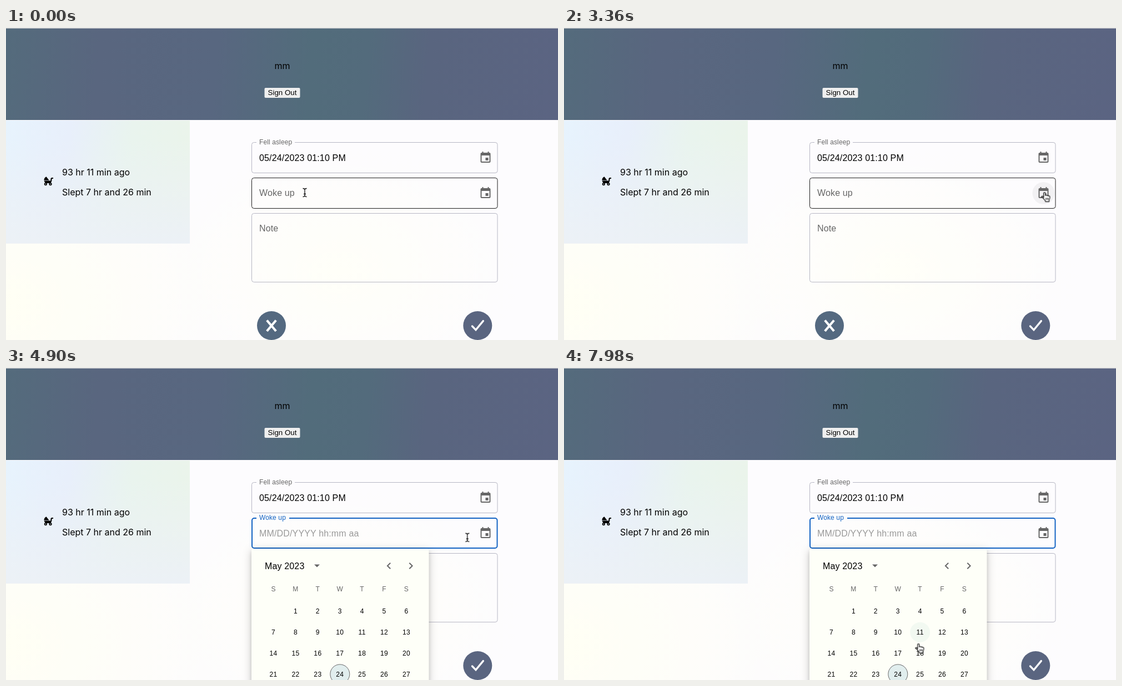
Write an HTML page that moves like this. It is 994 px wide and 563 px high and loops after 8000 ms.

```html
<!DOCTYPE html>
<html lang="en">
<head>
<meta charset="utf-8">
<title>Sleep log</title>
<style>
html, body { margin: 0; width: 100%; height: 100%; overflow: hidden; }
#stage {
  position: relative; width: 994px; height: 563px; overflow: hidden;
  background:
    radial-gradient(ellipse 420px 330px at 0 500px, #fffff4, #fffff400),
    radial-gradient(ellipse 330px 230px at 600px 440px, #fffff8, #fffff800),
    #fdfcfe;
}
#stage > * { position: absolute; left: 0; }
header {
  top: 0; width: 994px; height: 165px; border-top: 1px solid #c4c6cb;
  background: linear-gradient(95deg, #546b7c 0, #59667f 17%, #586780 38%, #526c7b 55%, #536b7c 65%, #59657f 76%, #5b6482);
}
aside {
  top: 167px; width: 331px; height: 222px;
  background:
    linear-gradient(0deg, #ecf1f6, #ecf1f600 85%),
    linear-gradient(100deg, #e7f3fd, #e8effb 32%, #e9f4ee 62%, #ebf4ea);
}
svg { top: 0; }
text { font: 16px "Liberation Sans", Arial, sans-serif; letter-spacing: .15px; }
.inter { font-family: Inter, sans-serif; letter-spacing: 0; }
.mid { text-anchor: middle; }
.small { font-size: 12px; letter-spacing: .11px; }
.days { font-size: 12px; letter-spacing: .4px; }
.grey { fill: #666; }
.line { fill: none; stroke: #b7b7c4; }
.dark { stroke: #1f1f1f; }
.blue { stroke: #1363c3; stroke-width: 2; }

.anim { animation: 8s linear infinite; }
.step { animation: 8s step-end infinite; }

.label { animation-name: label; }
@keyframes label {
  0%, 56% { transform: translate(456px, 303px); fill: #666; animation-timing-function: cubic-bezier(0, 0, .2, 1); }
  57.75%, 58.99% { transform: translate(456px, 275px) scale(.76); fill: #5a5a5a; }
  59.2%, 100% { transform: translate(456px, 274px) scale(.75); fill: #1363c3; }
}
.hint { animation-name: hint; }
@keyframes hint { 0%, 56% { opacity: 0 } 57.75%, 100% { opacity: 1 } }

.popup { animation-name: popup; transform-origin: 601.5px 326px; }
@keyframes popup {
  0%, 56% { opacity: 0; transform: scale(.75, .5625); }
  57.75%, 59% { opacity: .66; transform: scale(.973, .955); animation-timing-function: ease-out; }
  61%, 100% { opacity: 1; transform: none; }
}
.paper { fill: #fefff8; filter: drop-shadow(0 4px 3px #0002) drop-shadow(0 3px 8px #0003); }

.idle { animation-name: idle; }
@keyframes idle { 0% { opacity: 1 } 56%, 100% { opacity: 0 } }
.focus { animation-name: focus; }
@keyframes focus { 0% { opacity: 0 } 56% { opacity: 1 } 59%, 100% { opacity: 0 } }
.notched { animation-name: notched; }
@keyframes notched { 0% { opacity: 0 } 59%, 100% { opacity: 1 } }

.halo { animation-name: halo; }
@keyframes halo {
  0%, 9.2% { opacity: 0 } 11%, 56% { opacity: .045 }
  57.75%, 59% { opacity: .06 } 61%, 100% { opacity: 0 }
}
.dayhover { animation-name: dayhover; }
@keyframes dayhover { 0%, 97.7% { opacity: 0 } 98.8%, 100% { opacity: 1 } }

.cursor { animation-name: cursor; }
@keyframes cursor {
  0%, .5% { transform: translate(538px, 297px); animation-timing-function: ease-in-out; }
  10% { transform: translate(858px, 299px); animation-timing-function: ease-out; }
  16%, 56% { transform: translate(865px, 297px); }
  57.75%, 59% { transform: translate(838px, 303px); animation-timing-function: ease-out; }
  62%, 72% { transform: translate(830px, 306px); }
  78%, 91.5% { transform: translate(830px, 311px); animation-timing-function: ease-in-out; }
  99.75%, 100% { transform: translate(638px, 498px); }
}
.beam { animation-name: beam; }
@keyframes beam { 0% { opacity: 1 } 9.2% { opacity: 0 } 59.2% { opacity: 1 } 95%, 100% { opacity: 0 } }
.hand { animation-name: hand; }
@keyframes hand { 0% { opacity: 0 } 9.2% { opacity: 1 } 59.2% { opacity: 0 } 95%, 100% { opacity: 1 } }
</style>
</head>
<body>
<div id="stage">
  <header></header>
  <aside></aside>
  <svg id="art" width="994" height="563" viewBox="0 0 994 563"></svg>
</div>
<script>
const icons = {
  event: "M17 12h-5v5h5v-5zM16 1v2H8V1H6v2H5c-1.1 0-2 .9-2 2v14c0 1.1.9 2 2 2h14c1.1 0 2-.9 2-2V5c0-1.1-.9-2-2-2h-1V1h-2zm3 18H5V8h14v11z",
  left: "M15.4 7.4 14 6l-6 6 6 6 1.4-1.4L10.8 12z",
  right: "M10 6 8.6 7.4 13.2 12l-4.6 4.6L10 18l6-6z",
  down: "M7 10l5 5 5-5z"
};
// 24px icon centred on x, y
const icon = (name, x, y) =>
  `<path d="${icons[name]}" transform="translate(${x - 12} ${y - 12})" fill="#666"/>`;
const text = (x, y, str, cls = "") => `<text x="${x}" y="${y}" class="${cls}">${str}</text>`;

// Rounded field outline, open along the top edge from x = 451 to gapEnd
function outline(top, height, gapEnd, cls, inset = .5) {
  const l = 442 + inset, r = 885.5 - inset, t = top + inset, b = top + height - inset, c = 4;
  return `<path class="line ${cls}" d="M${gapEnd} ${t}H${r - c}a${c} ${c} 0 0 1 ${c} ${c}V${b - c}a${c} ${c} 0 0 1 ${-c} ${c}
    H${l + c}a${c} ${c} 0 0 1 ${-c} ${-c}V${t + c}a${c} ${c} 0 0 1 ${c} ${-c}H451"/>`;
}

function calendar() {
  const col = i => 481.6 + i * 39.9, row = i => 439 + i * 37.8;
  let out = [..."SMTWTFS"].map((d, i) => text(col(i), 403.2, d, "days mid grey")).join("");
  for (let day = 1; day <= 31; day++) {
    const x = col(day % 7), y = row(Math.floor(day / 7));
    if (day === 11) out += `<circle class="anim dayhover" cx="${x}" cy="${y}" r="18" fill="#f2f9f1"/>`;
    if (day === 24) out += `<circle cx="${x}" cy="${y}" r="17.5" fill="#e1eeee" stroke="#666"/>`;
    out += text(x, y + 4.2, day, "days mid");
  }
  return out;
}

const stroller = `
  <path d="M68.5 274.8Q68.3 270.5 72.5 268.2L77.6 274.8Z"/>
  <path d="M68.5 275.4H80.4V273Q80.4 270 83 270H85V272H83.2Q82.5 272 82.5 273.4Q82.5 278 79.6 280H72Q69 278.4 68.5 275.4Z"/>
  <g fill="#e9f1f7" stroke="#000" stroke-width="1.7"><circle cx="71.4" cy="281.6" r="1.8"/><circle cx="80" cy="281.6" r="1.8"/></g>`;

const buttons = `
  <circle cx="478" cy="537" r="26" fill="#546980"/>
  <path d="M469.8 527.5 486.2 547M486.2 527.5 469.8 547" stroke="#fff" stroke-width="4.2"/>
  <circle cx="849.3" cy="537" r="26" fill="#5a6580"/>
  <path d="M839.5 538 846 544.8 859.3 528.6" fill="none" stroke="#fff" stroke-width="3.4" stroke-linecap="round"/>`;

const pointer = `
  <g class="anim cursor">
    <path class="step beam" d="M-3.5-7.5Q0-7.5 0-5Q0-7.5 3.5-7.5M0-5V5M-3.5 7.5Q0 7.5 0 5Q0 7.5 3.5 7.5M-2 2.5H2" fill="none" stroke="#111" stroke-width="1.3"/>
    <g class="step hand" transform="translate(-5.5 -1.5)" stroke="#111" stroke-linejoin="round">
      <path fill="#fff" stroke-width="1.2" d="M4.3 11.2V2.6a1.5 1.5 0 0 1 3 0V7q.3-1.2 1.6-1 1.2 0 1.4 1.2.4-.8 1.5-.6 1 .2 1.2 1.3.4-.6 1.3-.4 1.2.3 1.2 1.8 0 3.2-1.4 5.4V17.6H7.2V16Q5 14 3.6 11.9 2.2 10.2 1 9.6.4 8.6 1.4 8 2.6 7.6 4.3 9.8"/>
      <path d="M8.2 11v3.6M10.4 11v3.6M12.5 11v3.6" stroke-width="1"/>
    </g>
  </g>`;

document.getElementById("art").innerHTML = `
  ${text(497.5, 74, "mm", "inter mid")}
  <rect x="465.5" y="108" width="64" height="18" rx="2" fill="#efefef"/>
  <text x="497.5" y="121.3" class="mid" style="font-size:13.33px;letter-spacing:0">Sign Out</text>
  ${stroller}
  ${text(101, 266, "93 hr 11 min ago", "inter")}
  ${text(101, 301.5, "Slept 7 hr and 26 min", "inter")}

  ${outline(206, 56, 520, "")}
  ${text(456, 210, "Fell asleep", "small grey")}
  ${text(456, 240, "05/24/2023 01:10 PM")}
  ${icon("event", 863.5, 234)}

  ${outline(270, 56, 451, "dark step idle")}
  ${outline(270, 56, 451, "blue step focus", 1)}
  ${outline(270, 56, 510, "blue step notched", 1)}
  <text class="anim label">Woke up</text>
  <g class="anim hint">${text(456, 303.5, "MM/DD/YYYY hh:mm aa").replace("<text", '<text fill="#999"')}</g>
  <circle class="anim halo" cx="863.5" cy="298" r="20"/>
  ${icon("event", 863.5, 298)}

  ${outline(334, 125, 451, "")}
  ${text(456, 367, "Note", "grey")}
  ${buttons}

  <g class="anim popup">
    <rect class="paper" x="442" y="326" width="319.5" height="340" rx="4"/>
    ${text(466, 362.5, "May 2023")}
    ${icon("down", 560, 356.5)}${icon("left", 689.5, 357)}${icon("right", 729, 357)}
    ${calendar()}
  </g>
  ${pointer}`;
</script>
</body>
</html>
```
